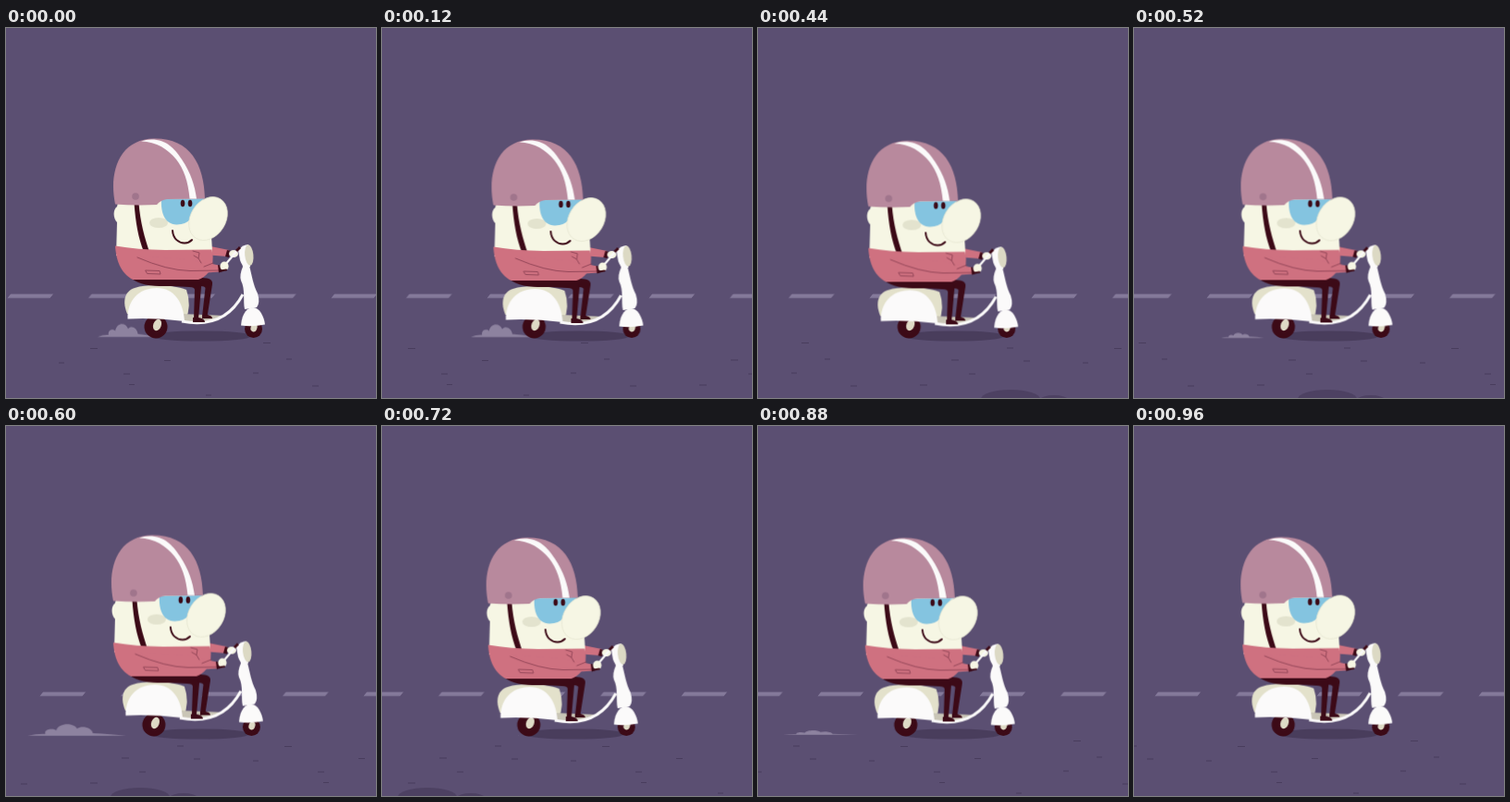
An HTML page that plays this animation: 400x400 px, repeating every 1000 ms.

```html
<!DOCTYPE html>
<html lang="en">
<head>
<meta charset="utf-8">
<title>Scooter ride</title>
<style>
  html, body { margin: 0; width: 100%; height: 100%; overflow: hidden; background: #5b4f72; }
  svg { display: block; width: 100vw; height: 100vh; }

  .dashes, .marks, .bumps { animation: 1s steps(25) infinite; }
  .dashes, .marks { animation-name: road; }
  .bumps { animation-name: near; }
  @keyframes road { to { transform: translateX(-525px); } }
  @keyframes near { to { transform: translateX(-800px); } }

  .sway { animation: sway 1s infinite; }
  @keyframes sway {
    0% { transform: none; animation-timing-function: cubic-bezier(.39, .575, .565, 1); }
    25% { transform: translateX(3.4px); animation-timing-function: cubic-bezier(.445, .05, .55, .95); }
    75% { transform: translateX(-3.4px); animation-timing-function: cubic-bezier(.47, 0, .745, .715); }
    100% { transform: none; }
  }

  .bounce { animation: bounce 1s ease-in-out infinite; }
  @keyframes bounce {
    0%, 100% { transform: none; }
    12% { transform: translateY(1px); }
    28% { transform: translateY(1.5px); }
    44% { transform: translateY(2.4px); }
    60% { transform: translateY(-1.5px); }
    80% { transform: translateY(2.4px); }
    96% { transform: translateY(.6px); }
  }

  /* three puffs leave the exhaust in each loop */
  .puff { animation: puff 1s linear infinite; }
  @keyframes puff {
    0%, 100% { transform: translate(99px, 334px) scale(.66, 1.1); }
    12% { transform: translate(96px, 334px) scale(.68, 1.05); }
    28% { transform: translate(77px, 335.5px) scale(.75, 1); }
    36% { transform: translate(50px, 335px) scale(.7, 0); }
    36.1%, 46% { transform: translate(148px, 335px) scale(0); }
    60% { transform: translate(24px, 335px) scale(1.07, 1); }
    68% { transform: translate(-30px, 335px) scale(1, 0); }
    68.1%, 72% { transform: translate(148px, 335px) scale(0); }
    80% { transform: translate(62px, 334px) scale(.84, 1.15); }
    92% { transform: translate(10px, 334px) scale(.8, 0); }
    92.1%, 96.5% { transform: translate(148px, 334px) scale(0); }
  }

  .glint { animation: glint 1s linear infinite; }
  @keyframes glint {
    0%, 18% { transform: translateX(-40px); }
    28% { transform: translateX(12px); }
    38% { transform: translateX(55px); }
    38.1%, 72% { transform: translateX(-40px); }
    80% { transform: translateX(-3px); }
    92%, 100% { transform: translateX(55px); }
  }

  .cream { fill: #f6f6e4; }
  .white { fill: #fbfafa; }
  .wine { fill: #3c0a17; }
  .coat { fill: #cf7180; }
  .seam { fill: none; stroke: #96485a; stroke-width: 1; stroke-linecap: round; }
</style>
</head>
<body>
<svg viewBox="0 0 400 400" preserveAspectRatio="none">
  <defs>
    <path id="lens" d="M168 185C167 200 172 212 184 212.500C197 213 203 204 206 194L215 184Z"/>
    <clipPath id="lensClip"><use href="#lens"/></clipPath>
    <path id="specks" fill="none" stroke="#493d5d" stroke-width="1.200"
      d="M91 346.500h8M171 359.500h7M127 374h7M278 340.500h8M267 373h6M216 397h6M133 385.500h6M406 386h8M440 359h8M331 387h7M303 358h6M500 346h7M459 374h7M518 360h7M57 362h6"/>
  </defs>

  <g class="dashes">
    <path d="M0 0H1000" transform="translate(3.300 289.800) skewX(-38)" fill="none"
      stroke="#84799a" stroke-width="4.300" stroke-dasharray="46 41.500"/>
  </g>
  <g class="marks">
    <use href="#specks"/>
    <use href="#specks" x="525"/>
  </g>
  <g class="bumps" fill="#4d4162">
    <ellipse cx="625" cy="401" rx="32" ry="10"/>
    <ellipse cx="672" cy="402" rx="15" ry="5"/>
  </g>

  <path class="puff" fill="#8d829f"
    d="M0 0Q10 -2.500 18 -2C16 -7 25 -9 29 -6C31 -14 46 -15 50 -8C55 -12 65 -9 66 -3Q85 -2 100 0Z"/>

  <g class="sway">
    <ellipse cx="211" cy="333" rx="54" ry="5.600" fill="#493d5c"/>

    <!-- wheels -->
    <circle class="wine" cx="162" cy="323" r="12.500"/>
    <ellipse cx="163.500" cy="321" rx="4.300" ry="6.500" fill="#dedac6" transform="rotate(20 163.500 321)"/>
    <circle class="wine" cx="267.500" cy="325.500" r="9.500"/>
    <ellipse cx="268" cy="324" rx="3.400" ry="4.500" fill="#dedac6" transform="rotate(20 268 324)"/>

    <g class="bounce">
      <!-- far arm -->
      <path class="coat" d="M216 235L241 240L239 247L214 245Z"/>
      <path class="wine" d="M239 240L243 241L241 248L237 247Z"/>
      <ellipse class="cream" cx="246" cy="244" rx="5" ry="4"/>

      <!-- scooter -->
      <path d="M131 309C126 297 127 285 139 281C155 276 181 278 195 283Q201 300 194 316L150 312Z" fill="#e3e1cb"/>
      <path d="M190 309L238 311C226 318 205 319 190 316Z" fill="#c9c5b6"/>
      <path d="M190 317C216 322 241 316 256 288" fill="none" stroke="#fbfafa" stroke-width="3"/>
      <path class="white" d="M131.500 314.500C131 295 143 281 163 281C182 281 192 297 193 317Q161 313 131.500 314.500Z"/>
      <path class="white" d="M253 243L261 241L263 257C266 268 267 277 272 287Q275 297 271 302L258 304C256 295 259 283 254 273Q252 267 256 258Z"/>
      <path class="white" d="M254 321.500C255 307 262 302 267 302C274 302 279 312 280 320.500Q266 323.500 254 321.500Z"/>
      <path class="white" d="M251 240Q256 234 262 234L264 258Q256 261 253 251Z"/>
      <ellipse cx="262.800" cy="245.500" rx="4.600" ry="11.300" fill="#dcd9c4" transform="rotate(-6 262.800 245.500)"/>
      <path d="M236 257L252 238" fill="none" stroke="#fbfafa" stroke-width="2.200"/>
      <path d="M249 241L253 237" fill="none" stroke="#3c0a17" stroke-width="3"/>

      <!-- legs -->
      <path class="wine" d="M132 268L212 270Q224 270 223 277L217.500 312L212 312L215.500 281Q215 279 210 279L166 279Q144 279 132 268Z"/>
      <path class="wine" d="M160 270L202 272Q212 273 211 280L208 314L203 314L204 283Q204 280 198 280L160 278Z"/>
      <path class="wine" d="M212 310h6q5 1 5 4h-11ZM202 313h6q7 1 7 5h-13Z"/>

      <!-- head and torso -->
      <path class="cream" d="M122 184L212 184C220 205 223 225 223 246L119 246L120 210C116 206 115 197 120 193Z"/>
      <path class="wine" d="M138.500 189L143.500 189C145 210 150 227 155 242L149 242C143 227 140 210 138.500 189Z"/>
      <path class="coat" d="M118 235.500Q142 239.500 172 240L222.500 239.500Q226 255 219 264Q214 270 208 272L137 272C123 264 119 250 118 235.500Z"/>
      <ellipse cx="165" cy="210.500" rx="10" ry="5.500" fill="#e3e3ce"/>

      <!-- near arm -->
      <path class="coat" d="M142 246L200 250L230 256.500L231 263.500Q203 266 181 262Z"/>
      <path class="seam" d="M142 248Q174 262 199 262.500L230 262M214 258L224 254M151 262L166 262.500L167 266L153 265.500ZM202 241L209 243L208 249L203 246M208 249L211 254"/>
      <path class="wine" d="M229 256L233 257L234 263L230 264.500Z"/>
      <ellipse class="cream" cx="236" cy="257.500" rx="4.600" ry="5"/>
      <path d="M232 262.500L238 261.500" fill="none" stroke="#3c0a17" stroke-width="2.200" stroke-linecap="round"/>

      <!-- face -->
      <use href="#lens" fill="#84c4e0"/>
      <g clip-path="url(#lensClip)">
        <path class="glint" d="M176 180H194L184 216H164Z" fill="#b2dcec"/>
      </g>
      <ellipse class="wine" cx="191" cy="189.500" rx="2.300" ry="3.800"/>
      <ellipse class="wine" cx="199" cy="189.500" rx="2.300" ry="3.800"/>
      <ellipse class="cream" cx="218.500" cy="206" rx="19" ry="25" transform="rotate(32 218.500 206)" stroke="#e4e4d0" stroke-width=".7"/>
      <path d="M180 219C180.500 228 187 232.500 193 232.500Q198 232.300 201 229" fill="none" stroke="#3c0a17" stroke-width="2" stroke-linecap="round"/>

      <!-- helmet -->
      <path d="M118 190.500C111 156 122 120 160 119.500C199 119 214 147 215 184.500L174 185Q167 186 163 191Q140 192 118 190.500Z" fill="#b8899d"/>
      <path class="white" d="M146 122.500Q152 120 160 120.500C176 122 184 133 190 142C200 157 204 170 206 184.500L198.500 184.500C197 166 192 152 184 142C175 131 163 123 146 122.500Z"/>
      <circle cx="140" cy="182" r="3.800" fill="#a0758c"/>
    </g>
  </g>
</svg>
</body>
</html>
```
